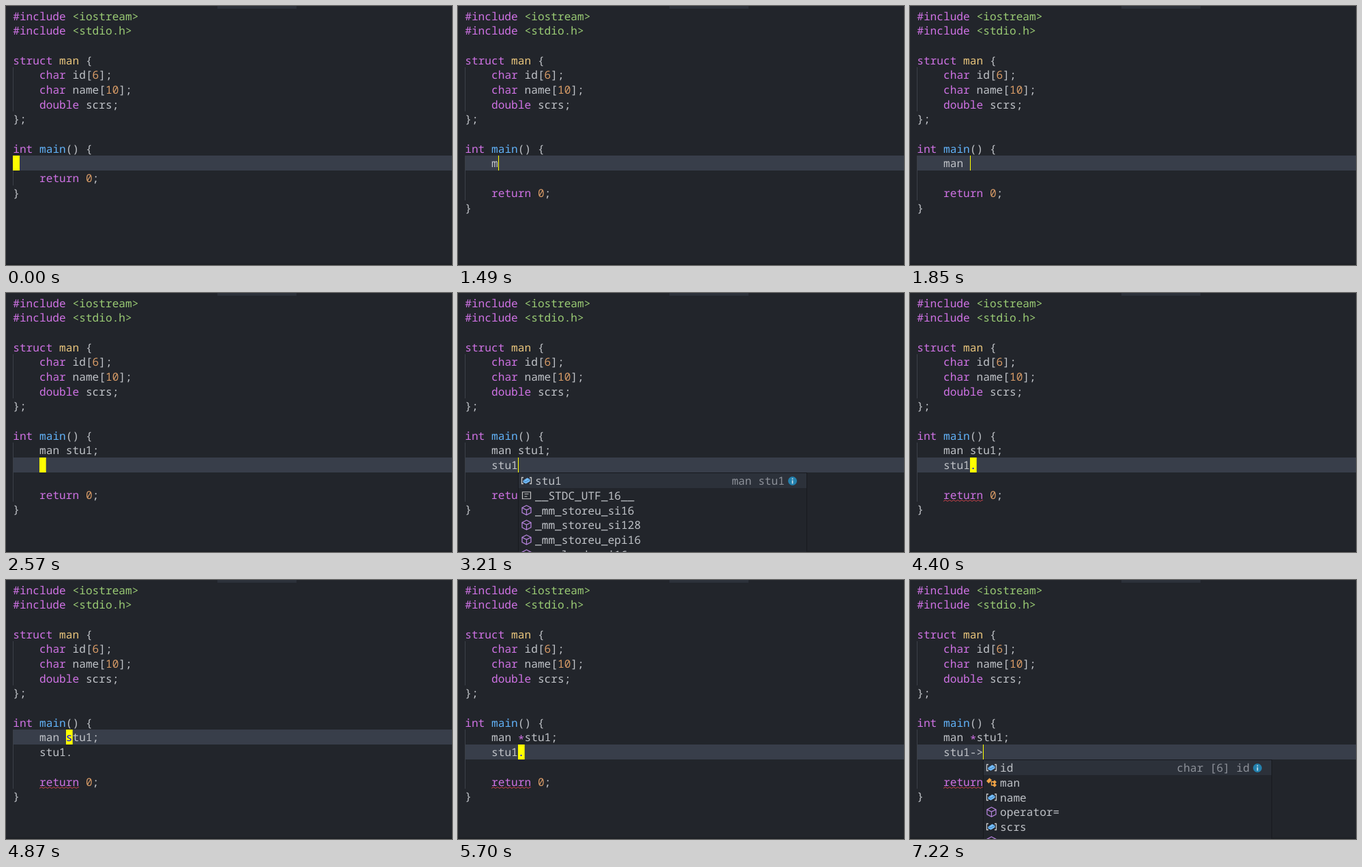
Write an HTML page that moves like this. It is 654 by 381 pixels and loops after 8000 ms.

```html
<!DOCTYPE html>
<html lang="en">
<head>
<meta charset="utf-8">
<title>Struct member access</title>
<style>
html, body { margin: 0; width: 100%; height: 100%; overflow: hidden; background: #22252b; }
svg { display: block; }
text { font: 500 16.17px "Noto Sans Mono", "DejaVu Sans Mono", monospace; white-space: pre; text-rendering: geometricPrecision; }
</style>
</head>
<body>
<svg id="stage" width="654" height="381" viewBox="0 0 654 381"></svg>
<script>
const LOOP = 8000, CHAR = 9.7, LEFT = 10.2, LINE = 21.69, TOP = 3.05;
const BG = '#22252b', PLAIN = '#bfc2c7', PURPLE = '#cf72e4', GREEN = '#9acb74',
      GOLD = '#eac67d', BLUE = '#61b2f8', ORANGE = '#d69a66', YELLOW = '#ffff00';

const colX = col => LEFT + col * CHAR;
const rowY = row => Math.ceil(TOP + row * LINE);
const escapeText = s => s.replace(/&/g, '&amp;').replace(/</g, '&lt;').replace(/>/g, '&gt;');
const rect = (x, y, w, h, fill) => `<rect x="${x}" y="${y}" width="${w}" height="${h}" fill="${fill}"/>`;
const text = (x, y, s, fill = PLAIN) => `<text x="${x}" y="${y}" fill="${fill}">${escapeText(s)}</text>`;

// Draws [string, colour] tokens one after another on the character grid.
function line(row, col, ...tokens) {
  return tokens.map(([s, fill]) => {
    const drop = s === '*' ? 3 : 0;
    const out = text(colX(col), rowY(row) + 17 + drop, s, fill);
    col += s.length;
    return out;
  }).join('');
}

const guide = (from, to) => rect(10, rowY(from), 1, rowY(to) - rowY(from), '#3b4048');

const header =
  rect(0, 0, 654, 381, BG) + rect(310, 0, 116, 4, '#2c313a') + rect(0, 379, 654, 2, '#1d2025') +
  line(0, 0, ['#include ', PURPLE], ['<iostream>', GREEN]) +
  line(1, 0, ['#include ', PURPLE], ['<stdio.h>', GREEN]) +
  line(3, 0, ['struct ', PURPLE], ['man', GOLD], [' {']) +
  line(4, 4, ['char', PURPLE], [' id['], ['6', ORANGE], ['];']) +
  line(5, 4, ['char', PURPLE], [' name['], ['10', ORANGE], ['];']) +
  line(6, 4, ['double', PURPLE], [' scrs;']) +
  line(7, 0, ['};']) +
  line(9, 0, ['int ', PURPLE], ['main', BLUE], ['() {']) +
  guide(4, 7);

// Suggestion icons, centred on 0,0.
const icons = {
  field: `<path d="M-4.500 -4.500H-7V4.500H-4.500M4.500 -4.500H7V4.500H4.500" fill="none" stroke="#c8c8c8" stroke-width="1.3"/>
    <path d="M-5 0L1 -4L5 -2V1L-1 4.500L-5 2.500Z" fill="#75beff"/><path d="M-4 .3L-1 1.700L4 -1.500" fill="none" stroke="#2b6796" stroke-width=".8"/>`,
  type: `<path d="M-7.500 -2L-3 -6.500L.5 -3.500L-4 1.500ZM1.500 -.5L4.500 -3.500L7.500 -.5L4.500 2.500ZM1.500 4L4.500 1L7.500 4L4.500 7Z" fill="#eea245"/>
    <path d="M-1 -1H3M0 -1V4H3" fill="none" stroke="#eea245" stroke-width="1.3"/>`,
  method: `<path d="M0 -7L6.500 -3.500V3.500L0 7L-6.500 3.500V-3.500ZM-6.500 -3.500L0 -.3L6.500 -3.500M0 -.3V7" fill="none" stroke="#b180d7" stroke-width="1.3"/>`,
  word: `<path d="M-6 -5H6V5H-6ZM-3 -2H3M-3 1.500H1" fill="none" stroke="#c5c5c5" stroke-width="1.2"/>`
};

const lists = {
  members: { detail: 'char [6] id', items: ['field id', 'type man', 'field name', 'method operator=', 'field scrs', 'method ~man'] },
  m: { detail: 'struct man', items: ['type man', 'method main', 'method malloc', 'method memcpy', 'method memset', 'method memcmp'] },
  s: { items: ['word struct', 'word static', 'word sizeof', 'word short', 'word signed', 'word switch'] },
  stu: { detail: 'man stu1', items: ['field stu1', 'word __STDC_UTF_16__', 'method _mm_storeu_si16', 'method _mm_storeu_si128', 'method _mm_storeu_epi16', 'method _mm_loadu_si16'] }
};

function popup(name, row, col) {
  const { detail, items } = lists[name];
  const x = Math.round(colX(col)), y = rowY(row + 1);
  let out = rect(x, y, 424, 140, '#181a1f') + rect(x + 1, y + 1, 422, 140, BG) + rect(x + 1, y + 1, 422, 22, '#2c313a');
  items.forEach((item, i) => {
    const [kind, label] = item.split(' ');
    const mid = y + 12 + i * 21.75;
    out += `<g transform="translate(${x + 12.5} ${mid})">${icons[kind]}</g>` + text(x + 25, Math.round(mid + 6), label);
  });
  if (detail) {
    out += text(x + 391 - detail.length * CHAR, y + 18, detail, '#8d9199') +
      `<circle cx="${x + 402.5}" cy="${y + 12.5}" r="6.5" fill="#2380ad"/>` +
      rect(x + 401.7, y + 11.5, 1.6, 5, '#d5e6ef') + rect(x + 401.7, y + 8.5, 1.6, 1.7, '#d5e6ef');
  }
  return out;
}

// Each step changes only the listed parts; list is [name, column].
const steps = [
  { at: 0, decl: '', use: '', end: 11, row: 10, col: 0, block: true, list: null, error: false },
  { at: 1030, end: 12, col: 4, block: false },
  { at: 1490, decl: 'm', col: 5 },
  { at: 1580, list: ['m', 5] },
  { at: 1670, decl: 'ma', col: 6 },
  { at: 1760, decl: 'man', col: 7 },
  { at: 1850, decl: 'man ', col: 8, list: null },
  { at: 1940, decl: 'man s', col: 9 },
  { at: 2030, decl: 'man st', col: 10, list: ['s', 9] },
  { at: 2120, decl: 'man stu', col: 11, list: null },
  { at: 2210, decl: 'man stu1', col: 12 },
  { at: 2400, decl: 'man stu1;', col: 13 },
  { at: 2490, col: 12, block: true },
  { at: 2570, end: 13, row: 11, col: 4 },
  { at: 2660, block: false },
  { at: 2940, use: 'st', col: 6 },
  { at: 3030, use: 'stu', col: 7 },
  { at: 3210, use: 'stu1', col: 8, list: ['stu', 8] },
  { at: 3490, use: 'stu1.', col: 9, list: null },
  { at: 3570, list: ['members', 9] },
  { at: 4120, error: true },
  { at: 4400, col: 8, block: true, list: null },
  { at: 4870, row: 10 },
  { at: 5050, block: false },
  { at: 5430, decl: 'man *stu1;', col: 9 },
  { at: 5700, row: 11, col: 8, block: true },
  { at: 6030, col: 9, block: false },
  { at: 6230, use: 'stu1', col: 8 },
  { at: 6630, use: 'stu1-', col: 9 },
  { at: 7130, use: 'stu1->', col: 10 },
  { at: 7220, list: ['members', 10] }
];
const states = [];
steps.forEach((step, i) => states.push({ ...states[i - 1], ...step }));

function squiggle(row) {
  const y = rowY(row) + 20.5;
  return `<path d="M49 ${y}${'l3 -2l3 2'.repeat(9)}l3 -2l1 .7" fill="none" stroke="#c8414b"/>`;
}

function cursor({ row, col, block, decl, use }) {
  const x = Math.round(colX(col)), y = rowY(row);
  if (!block) return rect(x, y, 1, 22, YELLOW);
  const letter = (row === 10 ? decl : use)[col - 4] || '';
  return rect(x, y, col ? 9.7 : 10, 22, YELLOW) + line(row, col, [letter, '#0000ff']);
}

function draw(state) {
  const { decl, use, end, row, list, error } = state;
  const declTokens = decl.split(/(\*)/).map(s => [s, s === '*' ? PURPLE : PLAIN]);
  return header +
    rect(10, rowY(row), 644, 22, '#383e4a') +
    guide(10, end + 1) +
    line(10, 4, ...declTokens) +
    line(11, 4, [use]) +
    line(end, 4, ['return ', PURPLE], ['0', ORANGE], [';']) +
    line(end + 1, 0, ['}']) +
    (error ? squiggle(end) : '') +
    (list ? popup(list[0], row, list[1]) : '') +
    cursor(state);
}

const stage = document.getElementById('stage');
const start = performance.now();
let shown;
function update() {
  const t = (performance.now() - start) % LOOP;
  const state = states.findLast(s => s.at <= t) || states[0];
  if (state !== shown) {
    shown = state;
    stage.innerHTML = draw(state);
  }
  requestAnimationFrame(update);
}
update();
</script>
</body>
</html>
```
